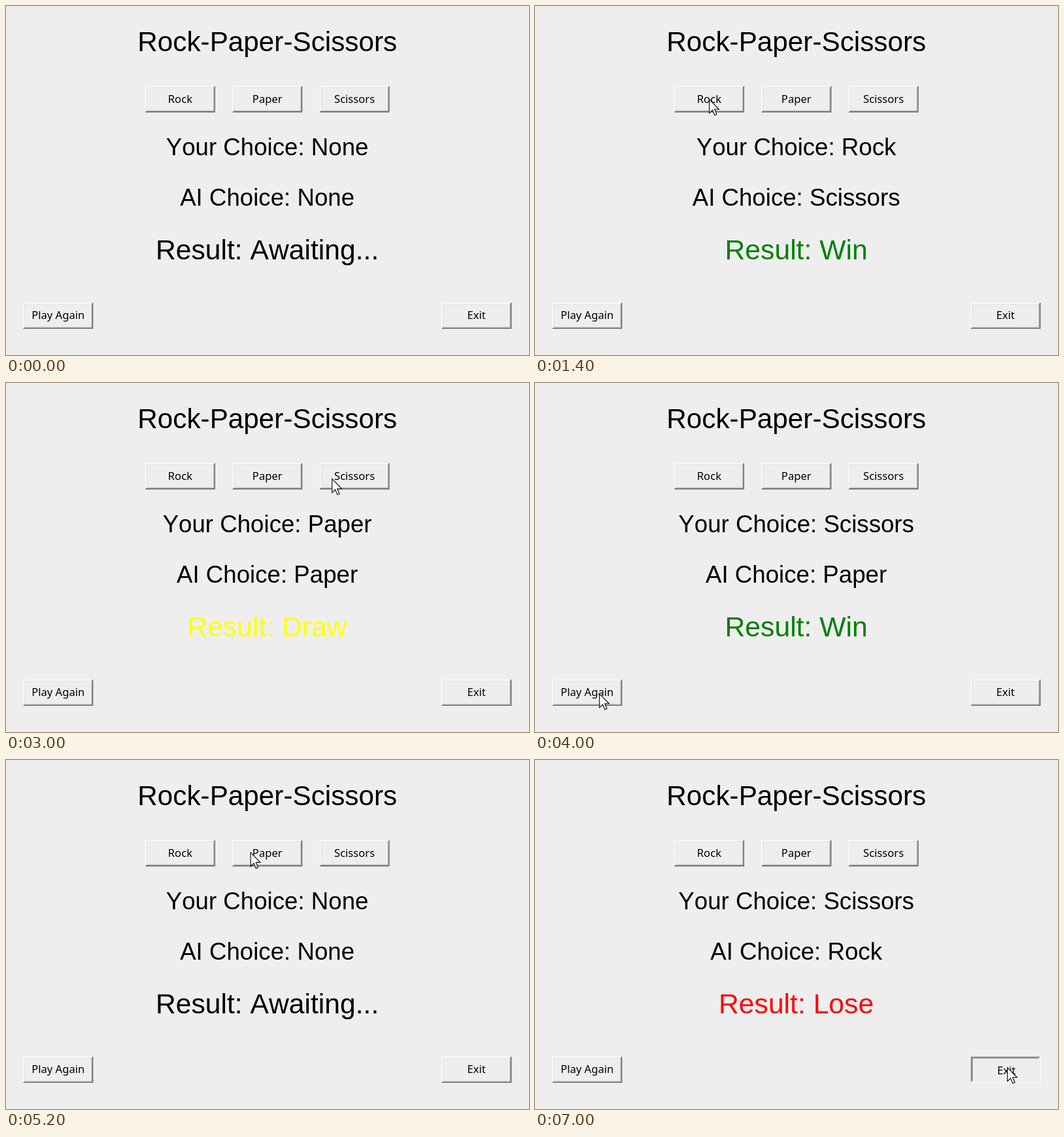
An HTML page for the animation above (7.2 s loop, 800 px wide and 533 px high).

```html
<!DOCTYPE html>
<html lang="en">
<head>
<meta charset="utf-8">
<title>Rock-Paper-Scissors</title>
<style>
  html, body { margin: 0; width: 100%; height: 100%; overflow: hidden; background: #eeeeef; }
  svg { display: block; width: 800px; height: 533px; }
  text { text-anchor: middle; font-family: "Liberation Sans", Arial, sans-serif; font-kerning: none; }
  .big { font-size: 32px; }
  .mid { font-size: 27.5px; }
  .button text { font: 12.45px "Noto Sans", "Open Sans", sans-serif; }
  .button path { fill: none; }
  .outer.top { stroke: #fff; }
  .inner.top { stroke: #e1e1e1; }
  .inner.bottom { stroke: #a0a0a0; }
  .outer.bottom { stroke: #696969; }
  .pressed .outer.top { stroke: #8c8c8c; }
  .pressed .inner.top { stroke: #6e6e6e; }
  .pressed .inner.bottom { stroke: #e6e6e6; }
  .pressed .outer.bottom { stroke: #fff; }
  .pressed text { transform: translate(1px, 1px); }
</style>
</head>
<body>
<svg viewBox="0 0 600 399.75">
  <text style="font-size: 31.7px" x="299.8" y="51.9">Rock-Paper-Scissors</text>
  <g id="buttons"></g>
  <text class="mid" id="yours" x="299.7" y="170.9"></text>
  <text class="mid" id="ai" x="299.7" y="228.9"></text>
  <text class="big" id="result" x="299.7" y="290.1"></text>
  <path id="cursor" d="M.5 .5V16.2L4.1 12.8L6.6 18.6L9 17.6L6.5 11.8H11.5Z" fill="#fff" stroke="#111" stroke-width=".9"/>
</svg>
<script>
const LOOP = 7200, STEP = 200, PRESS = 7000, TRAVEL = 600;
const moves = ["Rock", "Paper", "Scissors"];
const outcomes = [["Draw", "#ff0"], ["Win", "#008000"], ["Lose", "#f00"]];
const byId = id => document.getElementById(id);

const rounds = [
  { time: 0 },
  { time: 1200, yours: "Rock", ai: "Scissors" },
  { time: 2200, yours: "Paper", ai: "Paper" },
  { time: 3200, yours: "Scissors", ai: "Paper" },
  { time: 4200 },
  { time: 5400, yours: "Paper", ai: "Rock" },
  { time: 6000, yours: "Scissors", ai: "Rock" }
];

// Where the pointer comes to rest: arrival time, x, y
const stops = [
  [STEP, 400, 464], [1000, 266, 142], [2200, 407, 148], [3200, 530, 145], [4000, 98, 474],
  [4800, 298, 137], [5400, 400, 142], [5800, 486, 133], [6800, 722, 469]
];

function addButton(label, x, y) {
  byId("buttons").insertAdjacentHTML("beforeend", `
    <g class="button" id="${label}" transform="translate(${x} ${y})">
      <path class="inner top" d="M1.5 28V1.5H78"/>
      <path class="outer top" d="M.5 29V.5H79"/>
      <path class="inner bottom" d="M1 28.5H78.5V1"/>
      <path class="outer bottom" d="M0 29.5H79.5V0"/>
      <text x="39.8" y="19">${label}</text>
    </g>`);
}

function judge(yours, ai) {
  if (!yours) return ["Awaiting...", "#000"];
  return outcomes[(moves.indexOf(yours) - moves.indexOf(ai) + 3) % 3];
}

// The pointer rests at a stop, then travels just in time for the next one.
function cursorAt(t) {
  const i = stops.findLastIndex(stop => stop[0] <= t);
  const [left, x, y] = stops[i];
  const [arrive, nextX, nextY] = stops[i + 1] || stops[i];
  const travel = Math.min(TRAVEL, arrive - left) || 1;
  const k = Math.max(0, 1 - (arrive - t) / travel);
  const eased = k * k * (3 - 2 * k);
  return [x + (nextX - x) * eased, y + (nextY - y) * eased];
}

function draw(now) {
  const t = Math.floor(now % LOOP / STEP) * STEP;
  const { yours, ai } = rounds.findLast(round => round.time <= t);
  const [result, colour] = judge(yours, ai);
  byId("yours").textContent = `Your Choice: ${yours || "None"}`;
  byId("ai").textContent = `AI Choice: ${ai || "None"}`;
  byId("result").textContent = `Result: ${result}`;
  byId("result").setAttribute("fill", colour);
  byId("Exit").classList.toggle("pressed", t >= PRESS);

  const visible = t >= STEP;
  byId("cursor").style.display = visible ? "" : "none";
  if (visible) {
    const [x, y] = cursorAt(t);
    byId("cursor").setAttribute("transform", `translate(${x * 0.75} ${y * 0.75})`);
  }
}

moves.forEach((move, i) => addButton(move, 160 + i * 100, 91.8));
addButton("Play Again", 20, 339.8);
addButton("Exit", 500, 339.8);

const start = performance.now();
function frame() {
  draw(performance.now() - start);
  requestAnimationFrame(frame);
}
frame();
</script>
</body>
</html>
```
